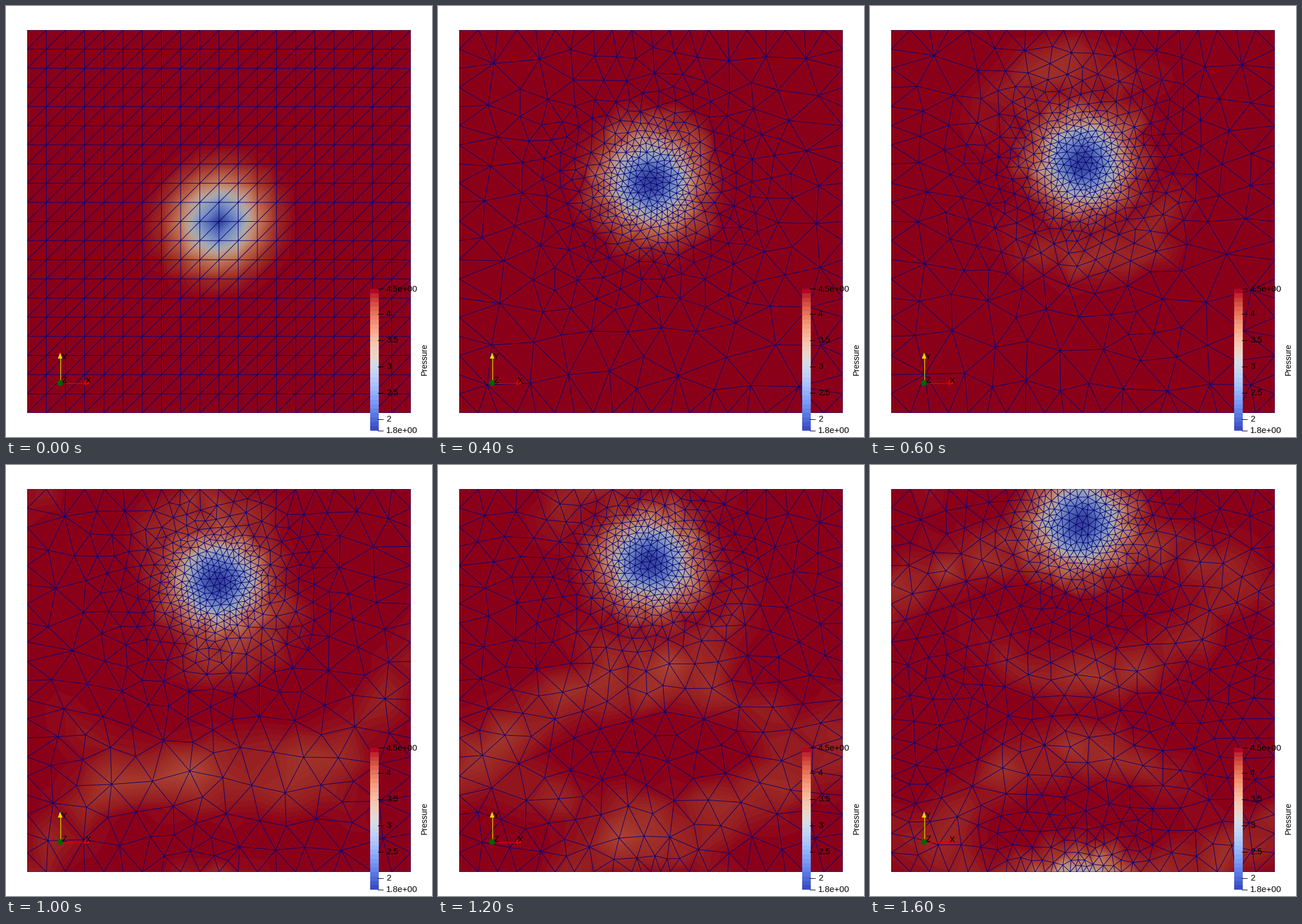
Recreate the animation shown at these times as a matplotlib script. Size 744 by 753 pixels, loop 1800 ms.

```python
import numpy as np
import matplotlib.pyplot as plt
from matplotlib.animation import FuncAnimation
from matplotlib.patches import Circle, Polygon, Rectangle
from matplotlib.tri import Triangulation

W, H, DPI = 744, 753, 100
PX = 72 / DPI
X0, X1, Y0, Y1 = 37, 707, 42, 711
SIDE = Y1 - Y0
CELLS = 20
STEPS = 9
EDGE = (0.03, 0.0, 0.47)


def center(k):
    return 372 - 0.35 * k, 376.5 - 34.5 * k


def offsets(p, k):
    """Offsets to the vortex and to its periodic copy below."""
    cx, cy = center(k)
    return [(p[:, 0] - cx, p[:, 1] - y) for y in (cy, cy + SIDE)]


def distance(p, k):
    return np.minimum(*[np.hypot(*d) for d in offsets(p, k)])


def size(p, k):
    """Wanted mesh spacing: fine at the core, coarser far away."""
    far = 74 - 4.6 * k
    return np.minimum(far, 11.5 + 0.2 * np.maximum(0, distance(p, k) - 75))


def border(k):
    corners = np.array([(X0, Y0), (X1, Y0), (X1, Y1), (X0, Y1)], float)
    points = []
    for a, b in zip(corners, np.roll(corners, -1, axis=0)):
        t = np.arange(CELLS) / CELLS
        mids = a + (b - a) * (t + 0.5 / CELLS)[:, None]
        parts = np.maximum(1, np.round(SIDE / CELLS / size(mids, k)))
        for start, n in zip(t, parts.astype(int)):
            points += [a + (b - a) * (start + j / n / CELLS) for j in range(n)]
    return np.array(points)


def candidates(k, rng):
    cx, cy = center(k)
    p = np.vstack([rng.normal((cx, cy), 80, (4500, 2)),
                   rng.normal((cx, cy + SIDE), 80, (1000, 2)),
                   rng.uniform((X0, Y0), (X1, Y1), (3500, 2))])
    rng.shuffle(p)
    gap = np.minimum.reduce([p[:, 0] - X0, X1 - p[:, 0],
                             p[:, 1] - Y0, Y1 - p[:, 1]])
    h = size(p, k)
    keep = gap > 0.42 * h
    return p[keep], h[keep]


def smooth(p, fixed):
    for _ in range(2):
        i, j = Triangulation(*p.T).edges.T
        total, count = np.zeros_like(p), np.zeros(len(p))
        for a, b in ((i, j), (j, i)):
            np.add.at(total, a, p[b])
            np.add.at(count, a, 1)
        mean = total[fixed:] / np.maximum(count[fixed:], 1)[:, None]
        p[fixed:] += 0.5 * (mean - p[fixed:])
    return p


def adaptive_mesh(k, rng):
    edge = border(k)
    p = np.zeros((10000, 2))
    n = fixed = len(edge)
    p[:n] = edge
    for c, h in zip(*candidates(k, rng)):
        if ((p[:n] - c) ** 2).sum(axis=1).min() > (0.78 * h) ** 2:
            p[n] = c
            n += 1
    return Triangulation(*smooth(p[:n].copy(), fixed).T)


def regular_mesh():
    x, y = np.meshgrid(np.linspace(X0, X1, CELLS + 1),
                       np.linspace(Y0, Y1, CELLS + 1))
    ids = np.arange(x.size).reshape(x.shape)
    a, b = ids[:-1, :-1].ravel(), ids[:-1, 1:].ravel()
    c, d = ids[1:, :-1].ravel(), ids[1:, 1:].ravel()
    cells = np.vstack([np.c_[a, b, c], np.c_[b, d, c]])
    return Triangulation(x.ravel(), y.ravel(), cells)


def waves(p, k):
    """Two faint rings that spread from the vortex, strongest on two sides."""
    depth = 0
    for dx, dy in offsets(p, k):
        r, angle = np.hypot(dx, dy), np.arctan2(dy, dx)
        lobes = 0.5 + 0.5 * np.cos(2 * (angle - np.radians(75)))
        for radius in (92 * (k - 1.1), 45 * (k - 2)):
            depth = depth + lobes * np.exp(-((r - radius) / 38) ** 2)
    return depth


def pressure(mesh, k, rng):
    p = np.c_[mesh.x, mesh.y]
    r = distance(p, k)
    if k == 0:
        v = 1 - np.exp(-(r / 60) ** 2)
    else:
        r = r * rng.normal(1, 0.06, len(r))
        v = 1 - 0.97 * np.exp(-(r / 68) ** 2.3)
        v -= 0.1 * v * rng.uniform(0.3, 1, len(r)) * waves(p, k)
    return np.clip(v, 1e-5, 1 - 1e-5)


def build(k):
    rng = np.random.default_rng(40 + k)
    mesh = adaptive_mesh(k, rng) if k else regular_mesh()
    return mesh, pressure(mesh, k, rng)


fig = plt.figure(figsize=(W / DPI, H / DPI), dpi=DPI, facecolor="white")
ax = fig.add_axes([0, 0, 1, 1])
ax.set_xlim(0, W)
ax.set_ylim(H, 0)
ax.axis("off")


def colors(n):
    return plt.get_cmap("coolwarm")(np.linspace(0, 1, n))[:, :3]


levels = np.linspace(0, 1, 129)
lit_colors = np.clip(colors(128) * 0.775 - (0, .012, .018), 0, 1)
stage = Rectangle((X0, Y0), X1 - X0, Y1 - Y0, transform=ax.transData)


def label(x, y, text, px=15, va="center_baseline", **kw):
    ax.text(x, y, text, fontsize=px * PX, family="Liberation Sans",
            va=va, zorder=8, **kw)


def line(x, y, color, width=1):
    ax.plot(x, y, color=color, lw=width * PX, zorder=6,
            solid_capstyle="butt")


def draw_legend():
    top, bottom, left, n = 494, 742, 636, 32
    step = (bottom - top) / n
    for i, color in enumerate(colors(n)):
        ax.add_patch(Rectangle((left, bottom - (i + 1) * step), 15, step,
                               fc=color, ec="none", aa=False, zorder=5))
    ticks = [(494, "4.5e+00"), (741.5, "1.8e+00")]
    ticks += [(537.5 + 92 * (4 - v), f"{v:g}") for v in (4, 3.5, 3, 2.5, 2)]
    for y, text in ticks:
        line((648.5, 659), (y, y), "black")
        label(664, y - 0.5, text)
    label(730.5, 617, "Pressure", 14, va="center", ha="center", rotation=90)


def draw_triad():
    line((94.5, 94.5), (655, 615), "#d8d800", 1.3)
    ax.add_patch(Polygon([(94.5, 605.5), (90.5, 616), (98.5, 616)],
                         fc="#e0dc00", ec="none", zorder=7))
    line((104, 138), (658.5, 658.5), "#e00000", 1.3)
    ax.add_patch(Polygon([(148, 658.5), (137, 654.5), (137, 662.5)],
                         fc="#e60000", ec="none", zorder=7))
    ax.add_patch(Circle((94.5, 658.5), 5, fc="#006400", ec="none", zorder=7))
    for x, y, name in ((143.5, 653.5, "X"), (101, 611.5, "Y"),
                       (102, 652.5, "Z")):
        label(x, y, name, 14, ha="center")


draw_legend()
draw_triad()
steps = [build(k) for k in range(STEPS)]
shown = []


def draw(k):
    while shown:
        shown.pop().remove()
    mesh, value = steps[k]
    shown.append(ax.tricontourf(mesh, value, levels=levels,
                                colors=lit_colors, zorder=1))
    shown.extend(ax.triplot(mesh, color=EDGE, lw=PX, marker="", zorder=2))
    for artist in shown:
        artist.set_clip_path(stage)
    return shown


anim = FuncAnimation(fig, draw, frames=STEPS, interval=200, repeat=True,
                     repeat_delay=0, init_func=lambda: [], blit=False)
plt.show()
```
